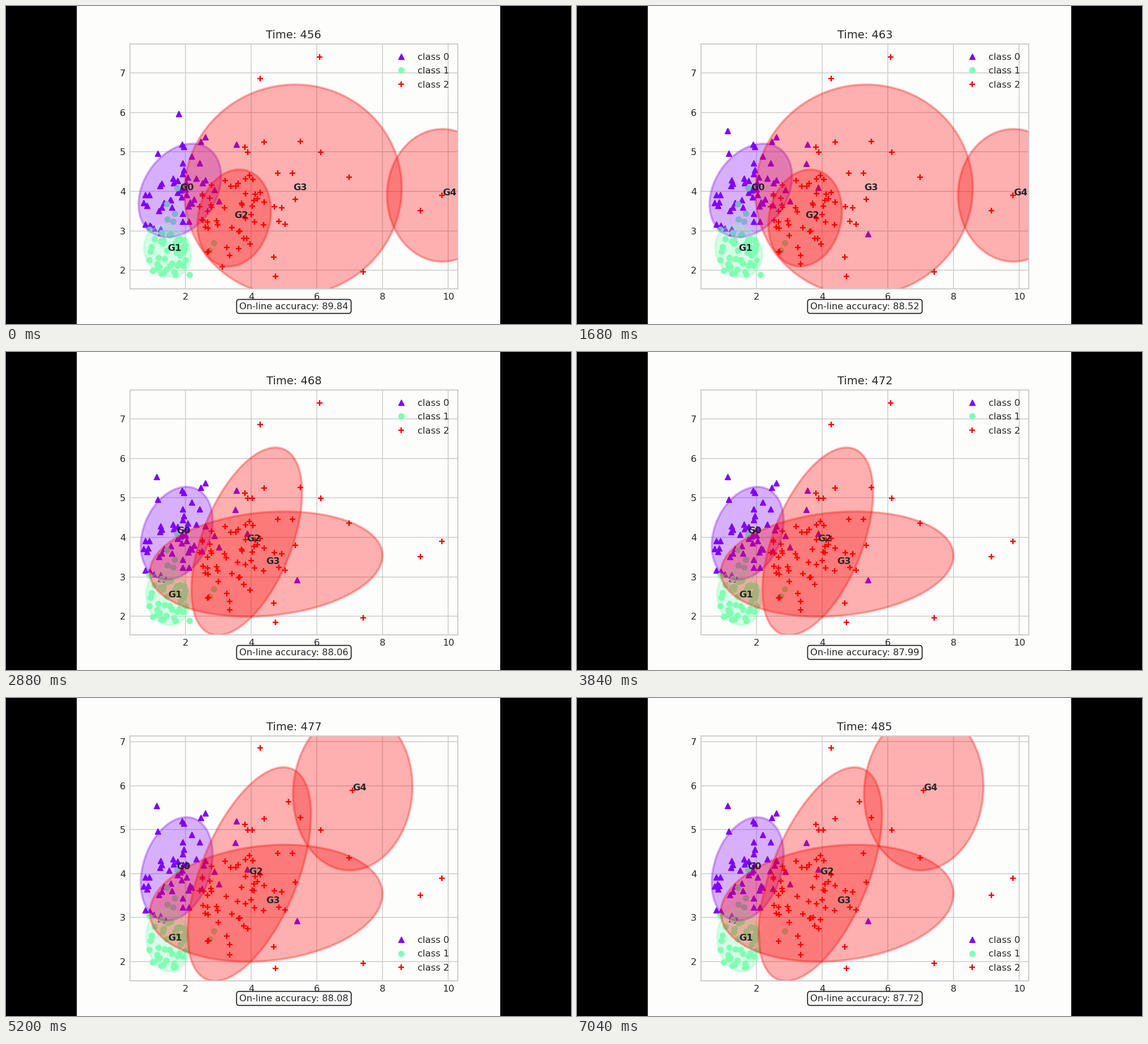
Animation, 998 px wide and 561 px high, one loop 7160 ms. Source, as a matplotlib script:

```python
import numpy as np
import matplotlib.pyplot as plt
from matplotlib.animation import FuncAnimation
from matplotlib.patches import Polygon, Rectangle

W, H = 998, 561
DPI = 72                 # one point equals one pixel
TICK_MS, LOOP_MS, STEP_MS = 40, 7160, 240
FIRST, EVER = 456, 999
REGROUP, RESCALE, REGROW = 467, 473, 477

VIOLET, MINT, RED = "#8000ff", "#80ffb4", "#ff0000"
INK, PAPER, LINE = "#262626", "#fdfdfc", "#cccccc"
FONT = 16.23

# Stray samples: x, y, then optionally the step of arrival and of leaving.
STRAY_0 = [
    (1.79, 5.97, FIRST, 463), (1.12, 5.54, 463), (1.16, 4.96), (1.90, 5.19),
    (1.95, 5.14), (2.47, 5.27), (2.60, 5.38), (2.19, 4.89), (.78, 3.17),
    (.78, 3.92), (3.02, 3.76), (2.88, 4.05), (3.55, 5.19, FIRST, 483),
    (3.88, 4.10, 457), (3.52, 4.71, 458), (5.39, 2.93, 459),
]
STRAY_1 = [
    (1.74, 4.09), (1.43, 3.69), (1.67, 3.44), (1.45, 3.30), (1.62, 3.24),
    (.90, 3.04), (1.00, 1.99), (2.86, 2.70), (2.74, 2.51, FIRST, 483),
    (2.12, 1.89, FIRST, 472),
]
STRAY_2 = [
    (4.27, 6.86), (4.39, 5.25), (5.50, 5.27), (6.12, 4.99), (3.81, 5.12),
    (3.89, 4.99), (6.98, 4.36), (5.26, 4.46), (5.35, 3.80), (4.70, 3.61),
    (4.93, 3.59), (4.84, 3.24), (5.03, 3.17), (4.69, 2.34), (4.74, 1.85),
    (7.41, 1.96), (9.15, 3.51), (9.81, 3.90), (4.81, 4.46, FIRST, 478),
    (6.08, 7.40, FIRST, RESCALE), (4.04, 4.99, 466), (5.14, 5.64, 474),
    (7.09, 5.89, REGROW),
]

# Marker, colour, size, edge, strays, then the dense cloud:
# its oval, how many samples show at once, steps between arrivals.
CLASSES = [
    ("^", VIOLET, 9.9, 1.4, STRAY_0, (1.72, 3.85, 1.05, .95, .35), 42, 3),
    ("o", MINT, 9.7, 1.4, STRAY_1, (1.50, 2.42, .64, .62, -.10), 42, 8),
    ("+", RED, 9.8, 2.4, STRAY_2, (3.40, 3.32, 1.05, 1.30, .05), 48, 3),
]

# Group ovals (centre x, y, half width, height, correlation), one per era;
# the last one is kept, None hides the group.
GROUPS = [
    (VIOLET, [(1.828, 4.025, 1.256, 1.185, .30),
              (1.733, 4.107, 1.094, 1.175, .27)]),
    (MINT, [(1.457, 2.488, .715, .653, -.15),
            (1.470, 2.482, .663, .703, -.10)]),
    (RED, [(3.481, 3.328, 1.120, 1.227, .14),
           (3.865, 3.900, 1.684, 2.377, .52),
           (3.942, 3.988, 1.878, 2.430, .555)]),
    (RED, [(5.273, 4.031, 3.308, 2.677, .02),
           (4.455, 3.327, 3.540, 1.330, .16)]),
    (RED, [(9.821, 3.902, 1.688, 1.680, 0),
           None,
           (7.090, 5.892, 1.817, 1.817, .05)]),
]
ACCURACY = [(456, 89.84), (460, 88.85), (465, 88.30), (468, 88.06),
            (474, 87.96), (480, 88.21), (485, 87.72)]

rng = np.random.default_rng(11)


def in_oval(shape, angle, radius=1):
    cx, cy, w, h, rho = shape
    return np.column_stack([cx + radius * w * np.cos(angle),
                            cy + radius * h * np.cos(angle - np.arccos(rho))])


def sample(x, y, first=FIRST, last=EVER):
    return x, y, first, last


def cloud(shape, shown, gap):
    """Samples in a sliding window: one arrives and one leaves every gap."""
    n = shown + 30 // gap
    xy = in_oval(shape, rng.uniform(0, 2 * np.pi, n),
                 np.sqrt(rng.uniform(0, 1, n)))
    first = FIRST + 1 + (np.arange(n) - shown) * gap
    return np.column_stack([xy, first, first + shown * gap])


fig = plt.figure(figsize=(W / DPI, H / DPI), dpi=DPI, facecolor="black")
fig.add_artist(Rectangle((125 / W, 0), 748 / W, 1, color=PAPER, lw=0,
                         transform=fig.transFigure, zorder=-1))
ax = fig.add_axes([218.5 / W, .11, 579.7 / W, .77], facecolor=PAPER)
ax.set_xlim(.303, 10.289)
ax.set_xticks(range(2, 11, 2))
ax.set_yticks(range(2, 8))
ax.set_axisbelow(True)
ax.grid(color=LINE, lw=1.5)
ax.tick_params(length=0, pad=7, labelsize=FONT, labelcolor=INK)
for spine in ax.spines.values():
    spine.set(color=LINE, linewidth=1.9)

classes = []
for i, (mark, color, size, edge, strays, *dense) in enumerate(CLASSES):
    line, = ax.plot([], [], mark, color=color, ms=size, mew=edge,
                    zorder=1.5, label=f"class {i}")
    pts = np.vstack([[sample(*s) for s in strays], cloud(*dense)])
    classes.append((line, pts))

groups = []
for i, (color, shapes) in enumerate(GROUPS):
    patch = ax.add_patch(Polygon([(0, 0), (1, 1)], closed=True, color=color,
                                 alpha=.3, lw=3.8, zorder=2))
    label = ax.text(0, 0, f"G{i}", size=FONT, weight="bold", color=INK,
                    zorder=3)
    groups.append((patch, label, shapes))

legend = ax.legend(loc="upper right", frameon=False, numpoints=1,
                   fontsize=FONT, labelcolor=INK, labelspacing=.58,
                   borderaxespad=.55)
title = ax.set_title("", size=19.48, pad=10, color=INK)
score = fig.text(508.5 / W, 1 - 530 / H, "", size=FONT, color=INK,
                 ha="center", va="center",
                 bbox=dict(boxstyle="round,pad=0.3", fc=PAPER,
                           ec="#1a1a1a", lw=1.7))


def update(frame):
    step = FIRST + frame * TICK_MS // STEP_MS
    era = (step >= REGROUP) + (step >= REGROW)
    ax.set_ylim((1.529, 7.73) if step < RESCALE else (1.558, 7.125))
    legend.set_loc("upper right" if era < 2 else "lower right")
    title.set_text(f"Time: {step}")
    score.set_text(f"On-line accuracy: {np.interp(step, *zip(*ACCURACY)):.2f}")

    for line, pts in classes:
        alive = pts[(pts[:, 2] <= step) & (step < pts[:, 3])]
        line.set_data(alive[:, 0], alive[:, 1])

    for patch, label, shapes in groups:
        shape = shapes[min(era, len(shapes) - 1)]
        patch.set_visible(shape is not None)
        label.set_visible(shape is not None)
        if shape:
            patch.set_xy(in_oval(shape, np.linspace(0, 2 * np.pi, 160)))
            label.set_position(shape[:2])
    return []


anim = FuncAnimation(fig, update, frames=LOOP_MS // TICK_MS,
                     interval=TICK_MS, repeat=True, repeat_delay=0)
plt.show()
```
